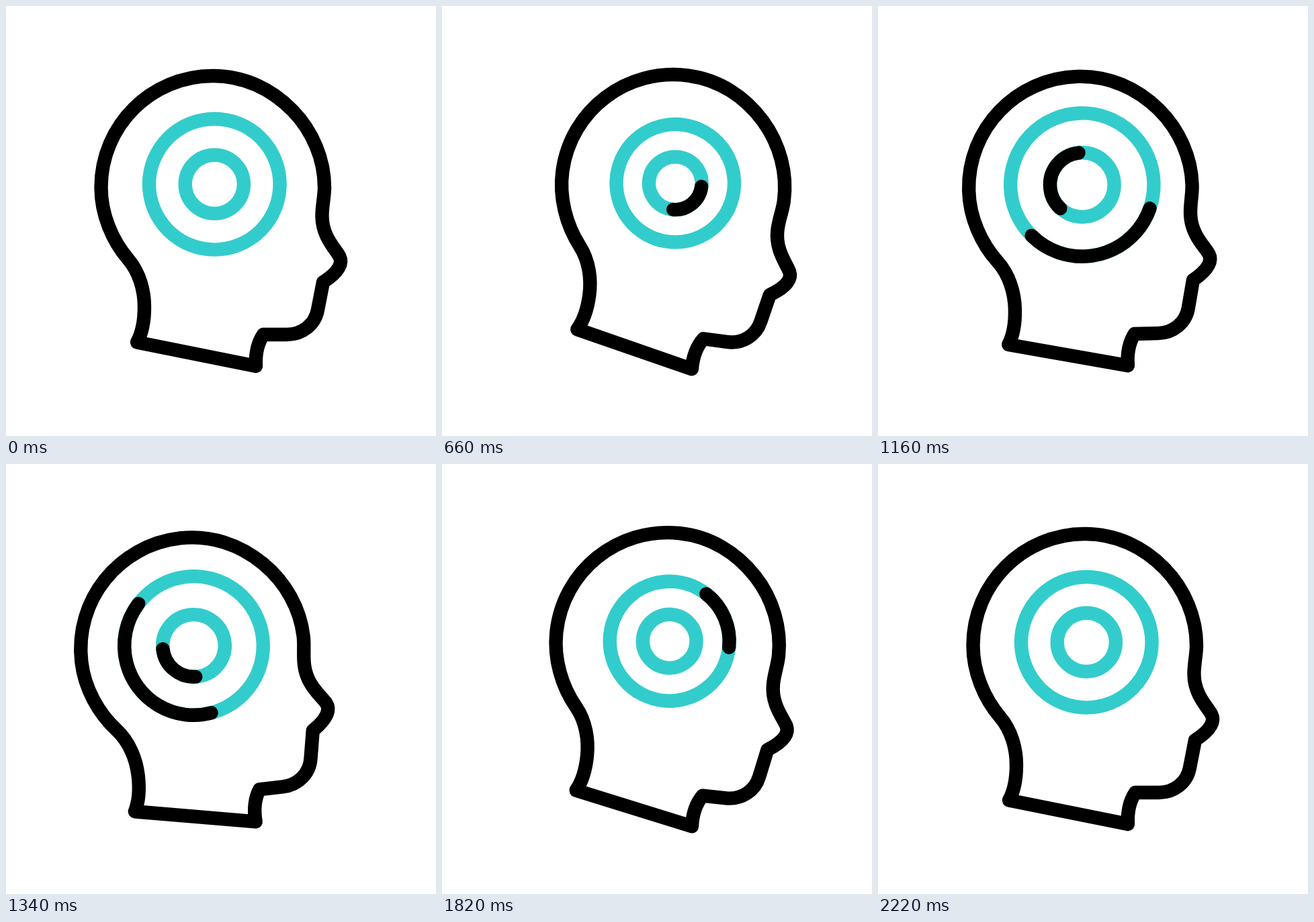
Write an HTML page with a canvas that moves like this. It is 640 by 640 pixels and loops after 2400 ms.

```html
<!DOCTYPE html>
<html lang="en">
<head>
<meta charset="utf-8">
<title>Focused mind</title>
<style>
  html, body { margin: 0; width: 100%; height: 100%; overflow: hidden; background: #fff; }
  canvas { display: block; width: 100%; height: 100%; object-fit: contain; }
</style>
</head>
<body>
<canvas id="stage" width="640" height="640"></canvas>
<script>
const ctx = document.getElementById('stage').getContext('2d');
const LOOP = 2400, STEP = 20;
const TEAL = '#33cccc', BLACK = '#000';
const TURN = Math.PI * 2;
const PIVOT = { x: 340, y: 537 };
const CENTRE = { x: 310.3, y: 265.3 };

const head = new Path2D(
  'M308 104 C354 104 395 123 427 156 C457 187 474 229 474 270' +
  'C474 285 470 299 470.5 314 C471 344 491 362 496.5 373' +
  'C501 382 497 395 472 411 L464 452 C460 474 441 489 418 489' +
  'L383 489 C375 501 371 518 372 536 L195 500.5' +
  'C204 484 206 465 206 448 C206 424 199 397 182 377' +
  'C158 349 141.5 310 141.5 270 C141.5 178 216 104 308 104 Z');

// [time, value] keys, eased in and out between neighbours
const tilt = [[200, 0], [800, 9], [1400, -7], [1800, 6], [2200, 0]];
const pulse = [[200, 1], [700, 0.9], [1200, 1.1], [1700, 0.9], [2200, 1]];

const rings = [
  { radius: 97.3, from: 0, dir: 1, start: 700 },
  { radius: 43.6, from: TURN / 4, dir: -1, start: 300 }
];
const SWEEP = 1100, LAG = 300;

function ease(t, a, b) {
  const u = Math.min(1, Math.max(0, (t - a) / (b - a)));
  return u * u * (3 - 2 * u);
}

function keyed(keys, t) {
  let value = keys[0][1];
  for (let i = 1; i < keys.length; i++) {
    value += (keys[i][1] - keys[i - 1][1]) * ease(t, keys[i - 1][0], keys[i][0]);
  }
  return value;
}

function arc(radius, a, b, colour, ccw) {
  ctx.strokeStyle = colour;
  ctx.beginPath();
  ctx.arc(CENTRE.x, CENTRE.y, radius, a, b, ccw);
  ctx.stroke();
}

function drawRing(ring, scale, t) {
  const r = ring.radius * scale;
  arc(r, 0, TURN, TEAL, false);
  const lead = ease(t, ring.start, ring.start + SWEEP);
  const tail = ease(t, ring.start + LAG, ring.start + LAG + SWEEP);
  if (lead > tail) {
    const at = p => ring.from + ring.dir * p * TURN;
    arc(r, at(tail), at(lead), BLACK, ring.dir < 0);
  }
}

function draw(t) {
  ctx.setTransform(1, 0, 0, 1, 0, 0);
  ctx.fillStyle = '#fff';
  ctx.fillRect(0, 0, 640, 640);
  ctx.translate(PIVOT.x, PIVOT.y);
  ctx.rotate(keyed(tilt, t) * Math.PI / 180);
  ctx.translate(-PIVOT.x, -PIVOT.y);
  ctx.lineWidth = 20.4;
  ctx.lineCap = ctx.lineJoin = 'round';
  ctx.strokeStyle = BLACK;
  ctx.stroke(head);
  const scale = keyed(pulse, t);
  rings.forEach(ring => drawRing(ring, scale, t));
}

const begin = performance.now();
function tick() {
  const t = Math.max(0, performance.now() - begin) % LOOP;
  draw(Math.floor(t / STEP) * STEP);
  requestAnimationFrame(tick);
}
tick();
</script>
</body>
</html>
```
